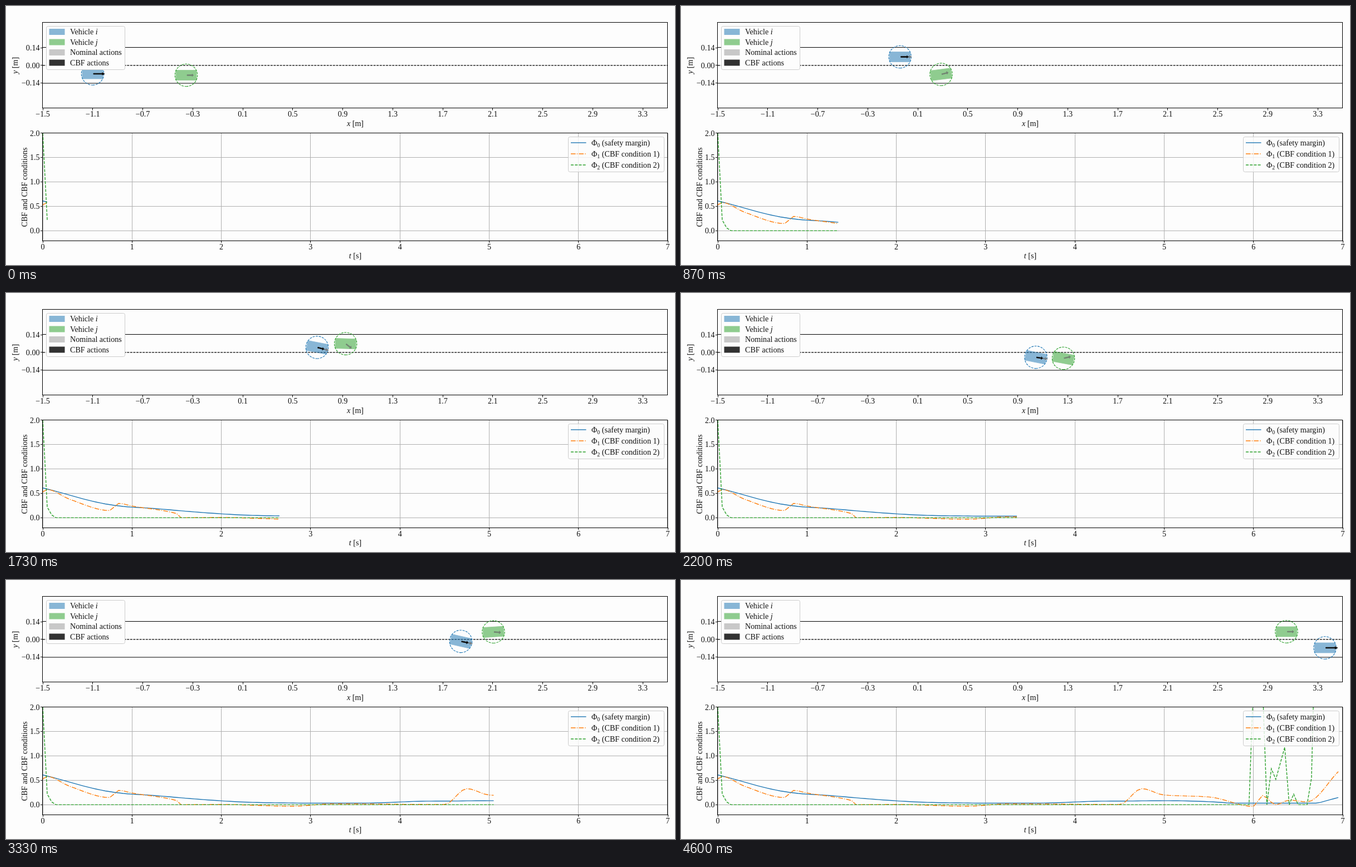
These frames come from a looping animation (1201x466 px, 4670 ms). An HTML page:

```html
<!DOCTYPE html>
<html lang="en">
<head>
<meta charset="utf-8">
<title>Vehicle overtaking with CBF conditions</title>
<style>
  html, body { margin: 0; width: 100%; height: 100%; overflow: hidden; background: #fdfdfd; }
  svg { display: block; width: 1201px; height: 466px; }
  text { font: 14.1px "Liberation Serif", "Noto Serif", serif; fill: #111; }
</style>
</head>
<body>
<svg viewBox="0 0 1201 466">
  <defs><clipPath id="plot"><rect x="66" y="229" width="1122" height="193"/></clipPath></defs>
  <g id="back"></g>
  <g id="cars"></g>
  <g id="curves" clip-path="url(#plot)"></g>
  <g id="front"></g>
</svg>
<script>
const BLUE = '#1f77b4', ORANGE = '#ff7f0e', GREEN = '#2ca02c';
const DASH = '5 2.2', DASH_DOT = '8.6 2.2 1.4 2.2';
const LOOP = 4670, FRAMES = 70, SCALE = 224.4;
const $ = id => document.getElementById(id);

// Axis mappings
const roadX = x => 66 + (x + 1.5) * SCALE;
const roadY = y => 106.8 - y * SCALE;
const plotX = t => 66 + t * 160.29;
const plotY = v => 404.4 - v * 87.75;

// SVG snippets
const snap = v => Math.floor(v) + .5;
const line = (x1, y1, x2, y2, stroke = '#000', width = 1, dash = 'none') =>
  `<line x1="${x1}" y1="${y1}" x2="${x2}" y2="${y2}" stroke="${stroke}" stroke-width="${width}" stroke-dasharray="${dash}"/>`;
const box = (x, y, w, h, attrs) => `<rect x="${x}" y="${y}" width="${w}" height="${h}" ${attrs}/>`;
const label = (x, y, s, anchor = 'middle', attrs = '') =>
  `<text x="${x}" y="${y + 4.7}" text-anchor="${anchor}" ${attrs}>${s}</text>`;
const italic = s => `<tspan font-style="italic">${s}</tspan>`;
const turned = (x, y, s) => label(0, 0, s, 'middle', `transform="translate(${x} ${y}) rotate(-90)"`);
const num = (v, digits) => v.toFixed(digits).replace('-', '−');

// Monotone cubic through a few [key, value] points
function through(points) {
  const last = points.length - 1;
  const step = i => points[i + 1][0] - points[i][0];
  const slope = i => (points[i + 1][1] - points[i][1]) / step(i);
  const tangent = i => {
    if (i === 0) return slope(0);
    if (i === last) return slope(last - 1);
    const a = slope(i - 1), b = slope(i);
    return a * b <= 0 ? 0 : 2 * a * b / (a + b);
  };
  return key => {
    let k = 0;
    while (k < last - 1 && points[k + 1][0] <= key) k++;
    const h = step(k), u = (key - points[k][0]) / h, w = 1 - u;
    return points[k][1] * w * w * (1 + 2 * u) + points[k + 1][1] * u * u * (3 - 2 * u)
      + h * u * w * (tangent(k) * w - tangent(k + 1) * u);
  };
}

function ease(n, from, to) {
  const u = Math.min(1, Math.max(0, (n - from) / (to - from)));
  return u * u * (3 - 2 * u);
}

// A vehicle drives along x while eased lane changes [from, to, dy] move it sideways
function vehicle(color, x, startY, changes) {
  const y = n => changes.reduce((sum, [from, to, dy]) => sum + dy * ease(n, from, to), startY);
  const rate = (f, n) => (f(n + .05) - f(n - .05)) / .1;
  const heading = n => Math.atan2(-rate(y, n), rate(x, n)) * 180 / Math.PI;
  return {
    color, x, y, heading,
    speed: n => rate(x, n),
    steer: n => heading(n) + 2.5 * rate(heading, n)
  };
}
const carI = vehicle(BLUE,
  through([[0, 155.5], [7, 300.5], [19, 473.5], [33, 637], [50, 816.5], [61, 978], [69, 1156]]),
  122, [[6.5, 12, -30.5], [21, 38, 30.5], [34.5, 42.5, -26], [42.5, 56.5, 26]]);
const carJ = vehicle(GREEN,
  through([[0, 323.5], [19, 533], [33, 686.5], [61, 997.5], [69, 1087]]),
  124.5, [[11, 27, -34], [25.5, 34, 28], [37, 51, -25.5]]);

// The safety margin follows the distance between the vehicles
function margin(t) {
  const n = 10 * t - .5;
  const gap = Math.hypot(carI.x(n) - carJ.x(n), carI.y(n) - carJ.y(n)) / SCALE;
  return Math.max(.033, 1.06 * gap - .205);
}
const condition1 = through([
  [0, .53], [.05, .58], [.3, .38], [.75, .148], [.85, .295], [1, .24], [1.5, .085], [1.55, 0],
  [2, .005], [2.8, -.03], [3.25, .02], [4.5, .005], [4.75, .33], [5, .2], [5.5, .16],
  [6, -.035], [6.1, .19], [6.25, 0], [6.4, .095], [6.6, .06], [6.95, .68]
]);
const condition2 = through([
  [0, 2], [.05, .22], [.15, 0], [5.95, 0], [6.05, 5], [6.15, 0], [6.2, .74], [6.25, .52],
  [6.35, 1.18], [6.4, 0], [6.45, .22], [6.5, 0], [6.6, 0], [6.65, .55], [6.95, 60]
]);
const series = [
  [margin, BLUE, 'none', 'safety margin'],
  [condition1, ORANGE, DASH_DOT, 'CBF condition 1'],
  [condition2, GREEN, DASH, 'CBF condition 2']
].map(([value, color, dash, name]) => ({
  color, dash, name,
  points: Array.from({ length: 2 * FRAMES }, (_, k) =>
    `${plotX(k / 20).toFixed(1)},${plotY(value(k / 20)).toFixed(1)}`)
}));

function drawAxes() {
  let back = line(66, 74.5, 1188, 74.5, '#000', 1.2) + line(66, 139, 1188, 139, '#000', 1.2)
    + line(66, 106.8, 1188, 106.8, '#000', 1.2, '4 1.6');
  let front = box(65.5, 29.5, 1122, 154, 'fill="none" stroke="#000"')
    + box(65.5, 228.5, 1122, 194, 'fill="none" stroke="#000"');
  for (let k = 0; k < 13; k++) {
    const v = -1.5 + .4 * k, x = roadX(v);
    front += line(snap(x), 184, snap(x), 187.5) + label(x, 194.5, num(v, 1));
  }
  for (const v of [.14, 0, -.14]) {
    const y = roadY(v);
    front += line(62, snap(y), 66, snap(y)) + label(60.5, y, num(v, 2), 'end');
  }
  for (let t = 0; t <= 7; t++) {
    const x = plotX(t);
    back += line(snap(x), 229, snap(x), 422, '#b0b0b0');
    front += line(snap(x), 422, snap(x), 426) + label(x, 433, t);
  }
  for (let v = 0; v <= 2; v += .5) {
    const y = plotY(v);
    back += line(66, snap(y), 1188, snap(y), '#b0b0b0');
    front += line(62, snap(y), 66, snap(y)) + label(60.5, y, num(v, 1), 'end');
  }
  front += label(627, 211, italic('x') + ' [m]') + label(627, 449, italic('t') + ' [s]')
    + turned(16, 107, italic('y') + ' [m]') + turned(33, 326, 'CBF and CBF conditions');
  $('back').innerHTML = back;
  $('front').innerHTML = front + drawLegends();
}

function drawLegends() {
  let out = box(72.5, 36.5, 141, 78, 'rx="3" fill="#fdfdfd" stroke="#ccc"');
  [['Vehicle ' + italic('i'), BLUE, .52], ['Vehicle ' + italic('j'), GREEN, .52],
    ['Nominal actions', '#808080', .42], ['CBF actions', '#000', .8]].forEach(([name, color, alpha], k) => {
    const y = 46.5 + 18.5 * k;
    out += box(78, y - 5, 27, 10, `fill="${color}" stroke="${color}" opacity="${alpha}"`)
      + label(115, y, name, 'start');
  });
  out += box(1009.5, 235.5, 172, 63, 'rx="3" fill="#fdfdfd" fill-opacity=".8" stroke="#ccc"');
  series.forEach(({ color, dash, name }, k) => {
    const y = 246 + 20 * k;
    out += line(1014, y, 1041.5, y, color, 1.4, dash)
      + label(1051, y, `Φ<tspan dy="3" font-size="10">${k}</tspan><tspan dy="-3"> (${name})</tspan>`, 'start');
  });
  return out;
}

function body(car, n) {
  return `<g transform="translate(${car.x(n)} ${car.y(n)})" fill="${car.color}" stroke="${car.color}">`
    + box(-18.5, -9, 37, 18, `transform="rotate(${-car.heading(n)})" stroke-width=".8" opacity=".52"`)
    + `<circle r="20.2" transform="scale(-1 1) rotate(90)" fill="none" stroke-width="1.1" stroke-dasharray="3.9 1.7"/></g>`;
}

function arrow(car, n, length, color, alpha) {
  return `<path transform="translate(${car.x(n)} ${car.y(n)}) rotate(${-car.steer(n)}) translate(1.5 0)"
    d="M0 -.7H${length * .8}V-2.1L${length} 0L${length * .8} 2.1V.7H0Z"
    fill="${color}" stroke="${color}" opacity="${alpha}"/>`;
}

function draw(n) {
  $('cars').innerHTML = body(carI, n) + body(carJ, n)
    + arrow(carI, n, 19.5, '#666', .7) + arrow(carJ, n, 11.5, '#666', .7)
    + arrow(carI, n, .96 * carI.speed(n), '#000', .9);
  $('curves').innerHTML = series.map(({ points, color, dash }) =>
    `<polyline points="${points.slice(0, 2 * n + 2).join(' ')}" fill="none" stroke="${color}"
      stroke-width="1.4" stroke-dasharray="${dash}"/>`).join('');
}

let shown = -1;
function tick() {
  // 15 steps per second, switched on whole hundredths
  const ms = performance.now() % LOOP;
  const n = Math.min(FRAMES - 1, Math.floor((Math.floor(ms / 10) + .5) * .15));
  if (n !== shown) draw(shown = n);
  requestAnimationFrame(tick);
}
drawAxes();
tick();
</script>
</body>
</html>
```
